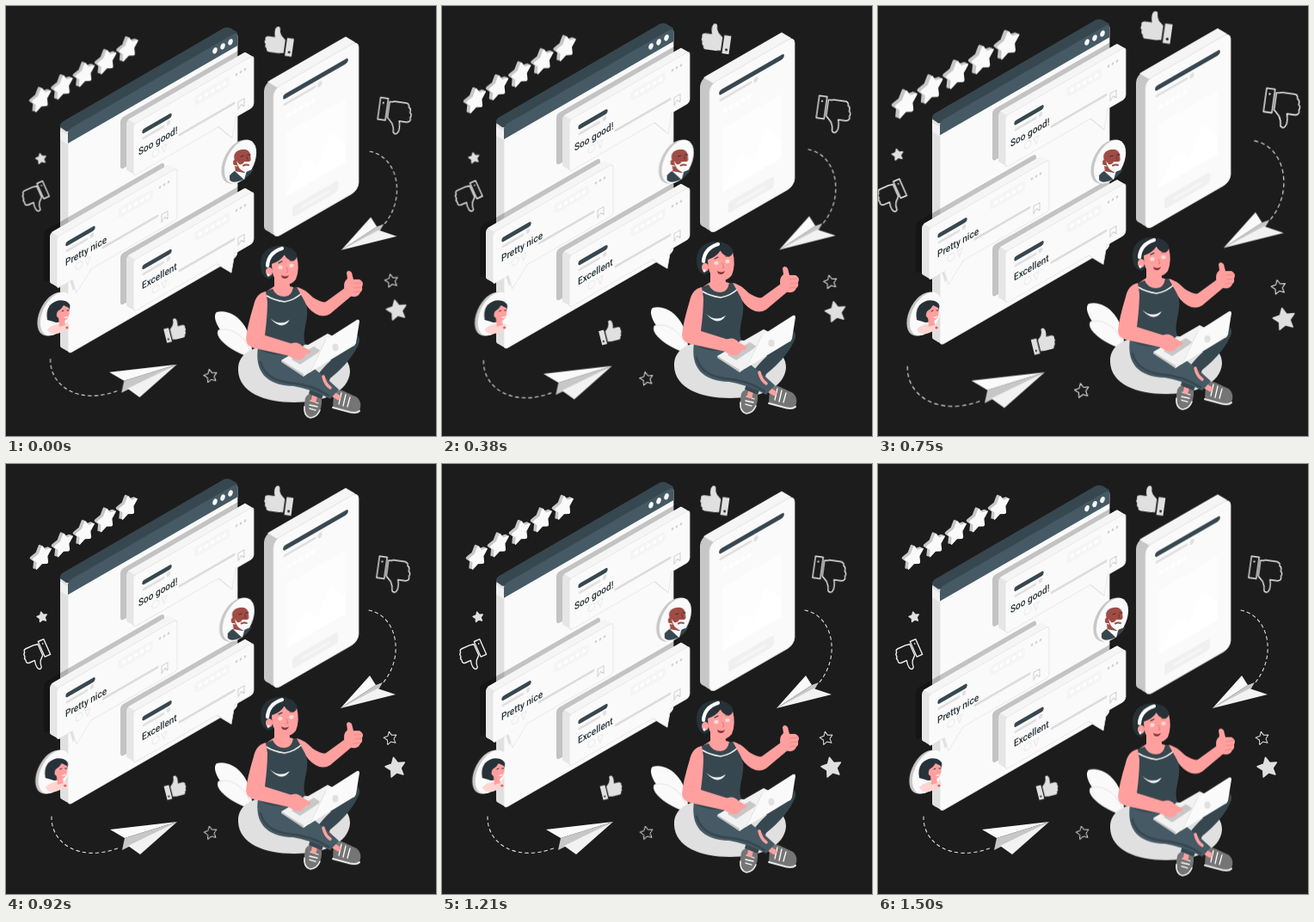
Recreate the animation shown at these times as an HTML page. Size 500 px wide and 500 px high, loop 1540 ms.

```html
<!DOCTYPE html>
<html lang="en">
<head>
<meta charset="utf-8">
<title>Customer reviews</title>
<style>
  html, body { margin: 0; width: 100%; height: 100%; overflow: hidden; background: #1c1c1c; }
  svg { display: block; width: 100vw; height: 100vh; }
  text { font: 500 11.6px Roboto, Arial, sans-serif; fill: #263238; }
  .line { fill: none; stroke-linecap: round; stroke-linejoin: round; }
</style>
</head>
<body>
<svg id="stage" viewBox="0 0 500 500"></svg>
<script>
const DARK = '#37474f', SLATE = '#455a64', INK = '#263238', SKIN = '#ffa09f', BROWN = '#a04c45';
const PAPER = '#fafafa', EDGE = '#e0e0e0', SHADE = '#c7c7c7', BG = '#1c1c1c';

const path = (d, fill, extra = '') => `<path d="${d}" fill="${fill}" ${extra}/>`;
const poly = (points, fill) => `<polygon points="${points}" fill="${fill}"/>`;
const stroke = (d, color, width, extra = '') =>
  `<path class="line" d="${d}" stroke="${color}" stroke-width="${width}" ${extra}/>`;
const oval = (x, y, rx, ry, fill, extra = '') =>
  `<ellipse cx="${x}" cy="${y}" rx="${rx}" ry="${ry}" fill="${fill}" ${extra}/>`;
const group = (transform, body) => `<g transform="${transform}">${body}</g>`;
// Left-facing isometric plane, x measured on screen
const wall = (x, y, body) => group(`matrix(1 -.577 0 1 ${x} ${y})`, body);
const part = (id, body) => `<g id="${id}">${body}</g>`;
const roundBox = (x, y, w, h, r, fill, extra = '') =>
  `<rect x="${x}" y="${y}" width="${w}" height="${h}" rx="${r}" fill="${fill}" ${extra}/>`;

// Extruded panel: depth runs up and to the left
function slab(x, y, w, h, r, depth, side, top) {
  const steps = 6, rise = depth * .577, at = u => `${x + u},${y - u * .577}`;
  const back = u => `${x + u - depth},${y - u * .577 - rise}`;
  let body = '';
  for (let i = steps; i > 0; i--) {
    const k = i / steps;
    body += wall(x - depth * k, y - rise * k, roundBox(0, 0, w, h, r, side));
  }
  return body + poly([at(r * .5), at(w - r * .5), back(w - r * .5), back(r * .5)].join(' '), top) +
    wall(x, y, roundBox(0, 0, w, h, r, PAPER, 'stroke="#e4e4e4" stroke-width=".8"'));
}

function starPath(r, inner = .5) {
  const points = [];
  for (let i = 0; i < 10; i++) {
    const a = i * Math.PI / 5 - Math.PI / 2, q = i % 2 ? r * inner : r;
    points.push((q * Math.cos(a)).toFixed(2) + ',' + (q * Math.sin(a)).toFixed(2));
  }
  return 'M' + points.join('L') + 'Z';
}

function ratingStar(i) {
  const x = 41.5 + 25 * i, y = 108 - 14.5 * i, d = starPath(11.8, .54);
  const layer = (dx, dy, c) => group(`matrix(.866 -.5 0 1 ${x + dx} ${y + dy})`,
    path(d, c, `stroke="${c}" stroke-width="2.6" stroke-linejoin="round"`));
  return layer(-3, -1, SHADE) + layer(-2, -.6, SHADE) + layer(-1, -.3, SHADE) + layer(.5, .4, PAPER);
}

function smallStar(x, y, r, solid) {
  const look = `stroke="${EDGE}" stroke-width="${solid ? 1.5 : 1}"`;
  return group(`translate(${x} ${y}) rotate(-12)`,
    path(starPath(r), solid ? EDGE : 'none', look + ' stroke-linejoin="round"'));
}

function thumb(x, y, angle, sx, sy, solid) {
  const hand = 'M11 15L17 10Q20 6 20 1Q24 -2 26 3Q27 8 25 13L34 13Q39 14 37 18Q39 21 36 23' +
    'Q37 27 34 28Q34 32 30 32L17 32Q14 31 11 31Z';
  const cuff = 'M0 12H9V34H0Z';
  const draw = d => solid ? path(d, EDGE) : stroke(d, '#f0f0f0', 1.3 / Math.abs(sx));
  return group(`translate(${x} ${y}) rotate(${angle}) scale(${sx} ${sy}) translate(-18 -17)`,
    draw(hand) + draw(cuff) + (solid ? oval(4, 29, 1.5, 1.5, BG) : oval(4, 29, 1, 1, EDGE)));
}

function card(x, y, tail, label, tx) {
  const tip = `M${tail[0]} 59L${tail[1]}L${tail[2]} 59Z`;
  const row = [0, 1, 2, 3, 4].map(i =>
    group(`translate(${78 + 7 * i} 14) scale(.8)`, path(starPath(4), '#fff'))).join('');
  const content =
    stroke('M13 14.500H42', DARK, 5.4) +
    stroke('M12 22.500H35', EDGE, 3) + oval(41, 21.5, 2.3, 2.8, EDGE) +
    stroke('M54 43H117', '#dcdcdc', 3) +
    roundBox(71, 8, 41, 12, 4, '#f5f5f5') + row +
    stroke('M122 44V53L125.500 49L129 53V44Z', '#d0d0d0', 1) +
    [120, 125, 130].map(cx => oval(cx, 11, 1.3, 1.5, '#cfcfcf')).join('') +
    stroke('M22 48A4 4 0 1 0 30 48A4 4 0 1 0 22 48M33 45H39L36 53Z', '#e9e9e9', 1) +
    group(`matrix(.866 0 0 1 ${tx} 39.500)`, `<text>${label}</text>`);
  return wall(x - 15, y - 7, roundBox(0, 0, 140, 60, 4, 'rgba(0,0,0,.22)')) +
    wall(x - 4, y - 2.3, path(tip, EDGE)) +
    slab(x, y, 140, 60, 4, 8, '#e6e6e6', '#f5f5f5') +
    wall(x, y, path(tip, PAPER) + stroke(`M${tail[0]} 60L${tail[1]}L${tail[2]} 60`, '#e4e4e4', .8) + content);
}

function browser() {
  return slab(72, 144, 197, 261, 5, 9, EDGE, DARK) +
    path('M63 145L72 150V161L63 156Z', '#f0f0f0') +
    path('M63 141Q62 137 67 134L253 26Q257 24 261 26L268 30Q270 32 268 35L76 146L70 146Z', DARK) +
    wall(72, 144, path('M0 16V5Q0 0 5 0H192Q197 0 197 5V16Z', SLATE)) +
    [243, 252, 261].map((x, i) => oval(x, 52 - 5 * i, 2.5, 3.8, PAPER, `transform="rotate(20 ${x} ${52 - 5 * i})"`)).join('');
}

function phone() {
  const content =
    stroke('M14 16H84', DARK, 5.8) +
    stroke('M13 25H48', EDGE, 3) + oval(54, 25, 2.6, 3, EDGE) +
    [0, 1, 2, 3, 4].map(i => group(`translate(${18 + 7 * i} 40)`, path(starPath(4), '#fff'))).join('') +
    roundBox(15, 59, 69, 75, 2, '#fdfdfd') +
    path('M16 130L37 102L51 118L66 88L83 112V133H16Z', '#fff') +
    roundBox(22, 149, 53, 13, 3, '#f0f0f0') + stroke('M33 156H64', '#f7f7f7', 3);
  return slab(311, 97, 99, 174, 8, 11, SHADE, '#f5f5f5') + wall(311, 97, content);
}

function disc(x, y, body) {
  const face = (dx, fill) => group(`matrix(.866 -.5 0 1 ${x + dx} ${y})`, oval(0, 0, 21.5, 23, fill));
  return face(-3, SHADE) + face(-1.5, SHADE) + face(.5, PAPER) + body;
}

const man = disc(272, 181,
  path('M260 197Q265 191 269 191L278 193Q285 191 288 189Q283 199 273 203Q263 207 260 202Z', DARK) +
  path('M266 186L275 188L277 199L267 193Z', BROWN) + poly('266,192 277,194 280,191 277,202', '#fff') +
  path('M266 181Q263 171 270 168Q281 164 284 172L285 183Q282 191 275 190Q268 188 266 181Z', BROWN) +
  oval(266.5, 182, 2.5, 3.3, BROWN) +
  path('M268 180L271 184Q275 185 277 181L283 181L285 179Q286 192 278 193Q270 191 268 180Z', PAPER) +
  stroke('M276 185.500Q279 184 282 185', BROWN, 2) +
  stroke('M273 175L276 174M281 173L284 173', INK, 1) + stroke('M280 175L281 179', '#6d302c', 1));

const lady = disc(58, 358, group('translate(1 2)',
  path('M47 363Q45 353 50 346Q58 338 68 341Q75 344 73 350L65 362Q60 368 54 365Z', INK) +
  path('M47 374Q53 367 61 368Q69 366 73 369Q69 376 59 379Q50 381 47 374Z', '#ffd5d1') +
  path('M60 360L67 362L68 369L61 371Z', SKIN) +
  path('M59 353Q64 350 66 346L72 349Q74 357 70 362Q65 367 60 361Q56 358 59 353Z', SKIN) +
  stroke('M64 353L66 352M70 352L72 352', INK, 1) + stroke('M67 360Q69 361 70 359', '#fff', 1.2) +
  oval(70, 372, 1.6, 1.6, '#e65b52')));

const planes =
  stroke('M422 170C456 177 464 226 437 256', EDGE, 1.1, 'stroke-dasharray="3.500 4"') +
  stroke('M53 410C52 441 86 464 132 446', EDGE, 1.1, 'stroke-dasharray="3.500 4"') +
  poly('389,284 423,246 430,257', PAPER) + poly('389,284 430,257 438,254 431,266', SHADE) +
  poly('389,284 432,261 453,268', '#f2f2f2') +
  poly('121,425 199,416 138,435', PAPER) + poly('138,435 199,416 143,445 135,449', SHADE) +
  poly('199,416 156,454 142,444', '#f2f2f2');

const icons =
  thumb(318, 42, 8, -.88, .95, true) + thumb(196, 375.5, -14, .66, .75, true) +
  thumb(449.5, 129, 8, 1, -1.15, false) + thumb(37, 223, -24, -.78, -.88, false) +
  smallStar(42, 178, 6, true) + smallStar(453, 353, 12, true) +
  smallStar(447, 319, 8, false) + smallStar(238, 429, 8, false);

const seat =
  path('M286 406C258 396 236 364 245 356C264 351 287 372 286 406Z', PAPER) +
  path('M286 409C262 402 242 386 247 377C263 372 282 386 286 409Z', PAPER, `stroke="${EDGE}" stroke-width=".8"`) +
  path('M270 424C269 402 290 393 330 393C375 393 401 405 400 426C398 449 370 461 335 461C300 461 271 449 270 424Z', EDGE);

const shoes =
  path('M348 456Q352 448 361 453L367 456Q368 468 362 476Q355 482 349 477Q345 471 348 456Z', '#757575') +
  stroke('M347 466Q346 477 354 479Q362 478 365 470', '#f0f0f0', 1.6) +
  stroke('M354 459L363 462M353 464L362 466M353 468L360 470', '#fff', 1.3) +
  path('M381 450Q386 444 393 448L408 455Q415 461 411 471Q405 474 395 470L380 467Z', '#757575') +
  stroke('M380 467L395 471Q407 475 411 471', '#f0f0f0', 2) +
  stroke('M390 450L387 463M395 452L392 465M400 455L397 466', '#fff', 1.3);

const legs =
  stroke('M360 449L358 458M378 450L386 455M370 432L377 441', SKIN, 6) +
  path('M335 402L392 380Q413 378 411 391Q403 412 377 433L367 457L352 451Q357 431 378 412Z', DARK) +
  path('M293 397C289 425 302 441 334 442Q357 446 377 457L387 446C371 431 352 418 338 402Z', SLATE) +
  stroke('M296 414Q301 434 328 438Q355 440 375 453', DARK, 2.5) +
  stroke('M369 431Q371 440 377 444', SKIN, 3.5);

const torso =
  path('M312 314L329 316L330 326L341 329L336 344Q322 350 306 341L303 332L312 326Z', SKIN) +
  path('M302 332C299 352 301 376 293 398C308 409 334 409 348 393C343 379 354 362 349 347Q346 335 341 327L334 327Q332 338 324 338Q314 338 310 329Z', DARK) +
  stroke('M303 337Q311 342 324 344Q336 342 345 333', '#f5f5f5', 1.6) +
  path('M307 363Q318 373 330 365Q321 379 307 363Z', '#f5f5f5');

const head =
  path('M297 309Q293 291 304 283Q317 275 332 282Q340 287 337 296L318 309L306 318Q299 316 297 309Z', INK) +
  path('M309 300Q319 297 324 289Q331 295 338 291Q342 306 337 318Q329 328 316 322Q309 315 309 300Z', SKIN) +
  oval(306, 309, 4, 5, SKIN) + oval(305, 313, 1.5, 1.7, '#fff') +
  stroke('M304 302Q305 287 321 282', '#fff', 4.2) +
  path('M318 286Q330 279 338 288Q339 294 335 296Q328 297 324 290Z', INK) +
  oval(319, 304, 2.6, 2.3, '#ffd9d6') + oval(332, 302, 2.6, 2.3, '#ffd9d6') +
  stroke('M317 299L321 297M330 296L334 296', INK, 1.1) +
  stroke('M326 304L328 309L326 310', '#e77872', 1) +
  path('M320 313Q325 316 329 313Q327 319 321 316Z', '#7d2f36');

const laptop =
  poly('320,412 374,381 400,394 346,431', '#f2f2f2') + poly('320,412 346,428 346,431 320,414', SHADE) +
  poly('332,411 358,396 366,401 342,417', SHADE) +
  path('M372 388L408 365Q411 364 411 367L407 392Q406 395 403 396L352 427Q360 408 372 388Z', PAPER) +
  stroke('M372 388L354 425', EDGE, 1) + oval(383, 397, 3.5, 4.2, EDGE);

const arms =
  path('M302 332Q291 334 288 348Q280 374 279 388Q280 396 289 398L330 407L336 394L301 383Q304 360 304 344Z', SKIN) +
  path('M328 394Q338 388 345 396L354 401Q355 405 349 405L344 411Q335 413 328 406Z', SKIN) +
  path('M338 327Q346 328 357 339Q368 346 372 344L394 328L402 337L377 358Q369 363 360 358Q350 352 347 343Z', SKIN) +
  path('M394 331Q391 322 397 317L396 310Q398 306 402 310L404 318L411 318Q417 321 414 327Q415 331 412 333Q410 339 403 338Q397 338 394 331Z', SKIN) +
  stroke('M405 323L413 322M405 328L413 327M404 333L411 332', '#e9817d', .8);

document.getElementById('stage').innerHTML =
  part('icons', icons) + part('planes', planes) +
  part('rating', [0, 1, 2, 3, 4].map(ratingStar).join('')) +
  part('window', browser() +
    card(148, 138, [99, '115 82', 119], 'Soo good!', 6) +
    card(59, 269, [18, '23 78', 40], 'Pretty nice', 10) +
    card(148, 296, [97, '114 80', 118], 'Excellent', 10)) +
  part('phone', phone()) +
  part('faces', man + lady) +
  part('person', seat + shoes + legs + torso + head + laptop + arms);

const LOOP = 1540;
function play(id, frames) {
  const anim = document.getElementById(id).animate(frames,
    { duration: LOOP, iterations: Infinity, iterationStart: .006, easing: 'linear' });
  anim.startTime = 0;
}
const shift = (x, y) => `translate(${x}px, ${y}px)`;

for (const id of ['window', 'phone', 'person'])
  play(id, [0, -10, 0].map(y => ({ transform: shift(0, y) })));

function beat(id, cx, cy, size) {
  document.getElementById(id).style.transformOrigin = `${cx}px ${cy}px`;
  const steps = [[0, 1], [.1, size], [.3, 1], [.4, 1], [.5, size], [.6, 1], [1, 1]];
  play(id, steps.map(([offset, s]) => ({ offset, transform: `scale(${s})` })));
}
beat('icons', 246, 232, 1.1);
beat('planes', 253, 312, 1.1);
beat('rating', 91.5, 79, 1.2);

play('faces', [[0, 0], [.485, 3], [.485, -3], [1, 0]]
  .map(([offset, x]) => ({ offset, transform: shift(x, 0) })));
</script>
</body>
</html>
```
